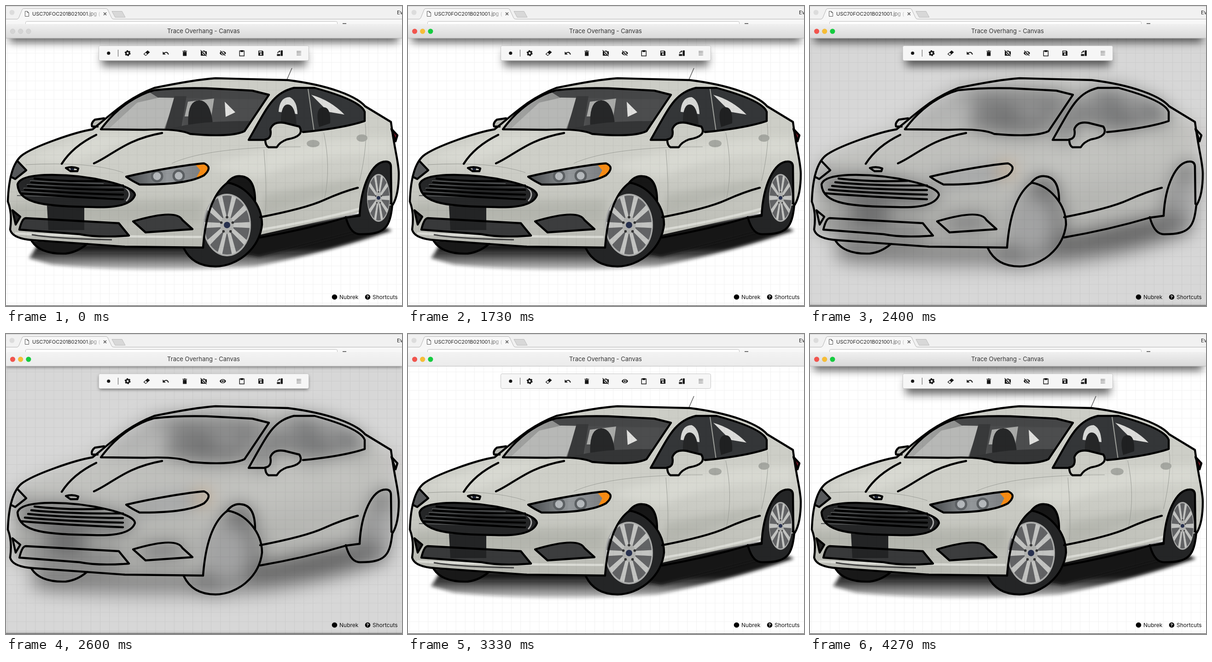
Recreate the animation shown at these times as an HTML page. Size 860x652 px, loop 4.34 s.

```html
<!DOCTYPE html>
<html lang="en">
<head>
<meta charset="utf-8">
<title>Canvas overlay</title>
<style>
html, body { margin: 0; width: 100%; height: 100%; overflow: hidden; background: #fff; }
svg { display: block; width: 860px; height: 652px; font-family: Inter, "Open Sans", sans-serif; }
.anim { animation: 4340ms step-end infinite; }
#photo { animation-name: photo; }
#frost { animation-name: frost; }
.deep { animation-name: deep; }
.mild { animation-name: mild; }
.slash { animation-name: slash; }
.lamps { animation-name: lamps; }
#speck { animation-name: speck; }
@keyframes photo { 0%, 76.65% { visibility: visible } 55.25% { visibility: hidden } }
@keyframes frost { 0%, 76.65% { visibility: hidden } 55.25% { visibility: visible } }
@keyframes deep { 0%, 78.3% { opacity: 1 } 56.85% { opacity: 0 } }
@keyframes mild { 0%, 62.85% { opacity: 0 } 56.85% { opacity: 1 } }
@keyframes slash { 0%, 78.3% { visibility: visible } 56.85% { visibility: hidden } }
@keyframes lamps { 0% { opacity: 0 } 27.6% { opacity: 1 } }
@keyframes speck { 0%, 27.6% { fill: #444 } 26% { fill: #d9453a } }
</style>
</head>
<body>
<svg viewBox="0 0 860 652">
  <defs>
    <linearGradient id="paint" x2="0" y2="1">
      <stop stop-color="#cccdc6"/><stop offset=".5" stop-color="#cecfc8"/><stop offset="1" stop-color="#b8b9b2"/>
    </linearGradient>
    <linearGradient id="glass">
      <stop stop-color="#a9aaa8"/><stop offset=".35" stop-color="#8c8d8c"/><stop offset=".5" stop-color="#4c4d4e"/>
    </linearGradient>
    <linearGradient id="lens">
      <stop stop-color="#45484a"/><stop offset=".5" stop-color="#93979a"/><stop offset="1" stop-color="#777a7d"/>
    </linearGradient>
    <linearGradient id="ground" x2="0" y2="1">
      <stop offset=".6" stop-color="#141414"/><stop offset="1" stop-color="#141414" stop-opacity=".25"/>
    </linearGradient>
    <linearGradient id="bar" x2="0" y2="1"><stop stop-color="#f3f3f3"/><stop offset="1" stop-color="#ebebeb"/></linearGradient>
    <linearGradient id="barDeep" x2="0" y2="1"><stop stop-color="#f0f0f0"/><stop offset="1" stop-color="#d9d9d9"/></linearGradient>
    <linearGradient id="fade"><stop offset=".78" stop-color="#222"/><stop offset="1" stop-color="#222" stop-opacity=".2"/></linearGradient>
    <pattern id="grid" x="3" y="82" width="20.1" height="20.1" patternUnits="userSpaceOnUse">
      <path d="M0 .5H20.1M.5 0V20.1" stroke="#000" stroke-opacity=".05"/>
    </pattern>
    <filter id="soft3" x="-10%" y="-50%" width="120%" height="200%"><feGaussianBlur stdDeviation="3.5"/></filter>
    <filter id="soft9" x="-20%" y="-99%" width="140%" height="300%"><feGaussianBlur stdDeviation="9"/></filter>
    <filter id="frosted" filterUnits="userSpaceOnUse" x="-60" y="0" width="980" height="720"
      color-interpolation-filters="sRGB"><feGaussianBlur stdDeviation="19"/></filter>
    <clipPath id="page"><rect y="70" width="860" height="582"/></clipPath>
    <clipPath id="inHull"><use href="#hull"/></clipPath>
    <clipPath id="inShield"><use href="#shield"/></clipPath>
    <clipPath id="inSide"><use href="#side"/></clipPath>
    <clipPath id="inLamp"><use href="#lamp"/></clipPath>
  </defs>

  <rect width="860" height="652" fill="#fff"/>
  <g clip-path="url(#page)">
    <g id="photo" class="anim"><g id="car">
      <path d="M50 548L70 518L400 512L760 455L838 488Q700 535 540 566Q300 582 100 562Z" fill="url(#ground)" filter="url(#soft3)"/>
      <path d="M425 522L760 455L780 485L550 545Z" fill="#181818" filter="url(#soft3)"/>
      <use href="#farTyre" fill="#181818"/>
      <use href="#hull" fill="url(#paint)"/>
      <g clip-path="url(#inHull)">
        <g filter="url(#soft9)" opacity=".5">
          <path d="M35 330L180 280L330 274L130 345ZM440 350Q600 285 840 285V325Q650 320 550 375Z" fill="#e2e3dc"/>
          <path d="M560 410L770 375L765 395L556 459ZM10 430L430 420L425 470L10 465Z" fill="#a6a8a0"/>
        </g>
        <path d="M20 494Q110 500 425 502M555 486Q680 465 770 440" stroke="#dadbd5" stroke-width="5" fill="none"/>
        <path d="M56 497Q110 506 230 508" stroke="#444" stroke-width="3" fill="none"/>
      </g>
      <g fill="none" stroke="#9c9e98">
        <path d="M43 345Q180 337 255 362M360 342Q440 306 640 306"/>
        <path d="M560 312Q567 390 563 455M690 275Q706 350 692 418M780 255Q786 300 768 380"/>
        <path d="M610 160L621 135" stroke="#666" stroke-width="1.6"/>
      </g>
      <g fill="#a5a7a1"><ellipse cx="667" cy="299" rx="14" ry="8"/><ellipse cx="773" cy="287" rx="12" ry="8"/></g>

      <use href="#shield" fill="url(#glass)"/>
      <g clip-path="url(#inShield)">
        <path d="M222 268L285 210L372 190L343 268Z" fill="#b7b8b6"/>
        <path d="M300 180H575L560 203L330 199Z" fill="#454647"/>
        <path d="M366 196H392L380 270H345Z" fill="#38393a"/>
        <path d="M395 208L452 201L446 240H388Z" fill="#a9aaa8"/>
        <path d="M396 265Q392 206 419 205T450 265Z" fill="#262728"/>
        <path d="M475 208L498 231L477 241Z" fill="#e0e0de"/>
        <path d="M345 272Q390 250 530 250V290Z" fill="#343536"/>
      </g>
      <use href="#side" fill="#343638"/>
      <g clip-path="url(#inSide)">
        <path d="M592 230Q594 198 616 198Q632 205 633 235Z" fill="#d6d7d5"/>
        <path d="M597 256Q596 214 612 214T631 257Z" fill="#252627"/>
        <path d="M663 193Q705 205 735 236L700 230Z" fill="#dcdcda"/>
        <path d="M680 263Q670 222 688 220T704 255Z" fill="#1f2021"/>
        <path d="M656 180L669 272" stroke="#a0a29d" stroke-width="2"/>
      </g>
      <use href="#mirror" fill="#cbccc5"/><use href="#cap" fill="#b9bab4"/>

      <use href="#lamp" fill="url(#lens)"/>
      <g clip-path="url(#inLamp)">
        <path d="M409 342H450L432 370L414 372L422 357Z" fill="#f78b13"/>
        <g fill="#b4b8bb" stroke="#5c6063" stroke-width="5"><circle cx="328" cy="370" r="11"/><circle cx="375" cy="369" r="11"/></g>
      </g>
      <use href="#farLamp" fill="#57595b"/><use href="#tail" fill="#7a1626"/>
      <use href="#grille" fill="#252627"/><use href="#intake" fill="#38393a"/>
      <use href="#fog" fill="#3c3d3e"/><use href="#farFog" fill="#222"/>
      <path d="M253 391Q278 405 261 424" stroke="#aaa" stroke-width="3" fill="none"/>
      <path d="M89 434L170 438V487H92Z" fill="#232425"/>
      <circle cx="144" cy="354" r="4" fill="#1b2235"/>
      <g id="bars" stroke="#555758" stroke-width="2" fill="none"></g>
      <use href="#arch" fill="#161616"/><use href="#tyre" fill="#242526"/>
      <use href="#rearArch" fill="#242526"/><use href="#rearTyre" fill="#242526"/>
      <g id="wheels"></g>
    </g></g>

    <g id="frost" class="anim">
      <g filter="url(#frosted)"><rect x="-80" width="1020" height="740" fill="#fff"/><use href="#car"/></g>
      <rect width="860" height="652" fill="#b2b2b2" fill-opacity=".52"/>
      <path d="M0 649H860" stroke="#888"/>
    </g>
    <rect y="70" width="860" height="582" fill="url(#grid)"/>

    <!-- hand-drawn outline, also used as fills above -->
    <g fill="none" stroke="#000" stroke-width="4.4" stroke-linecap="round" stroke-linejoin="round">
      <path id="hull" d="M428 525L258 523L60 509Q14 506 9 486Q14 450 4 425C5 395 10 345 34 325C60 305 150 274 188 268C235 230 265 200 322 178Q410 160 455 157L612 161C700 172 760 195 780 218L836 252C845 320 853 340 853 365Q853 410 840 432"/>
      <path id="cap" d="M199 262H187Q184 254 193 247L213 244"/>
      <path id="shield" d="M206 268C245 215 290 192 322 183Q390 176 460 180L535 184L571 193L518 272Q490 286 400 278Q375 266 300 269Z"/>
      <path d="M121 343Q145 305 196 280M191 342C230 325 260 290 339 276"/>
      <path id="side" d="M563 291H527C570 215 580 190 625 178H670Q770 205 779 230V250Q730 266 645 274"/>
      <path id="mirror" d="M563 290Q578 288 574 268Q580 250 605 254L637 262Q650 283 610 290Q594 296 588 307H570Q563 303 563 290"/>
      <path id="tail" d="M837 267L850 281L846 294Z"/>
      <path id="rearArch" d="M768 456C771 390 795 338 825 338Q836 338 836 350L837 430"/>
      <path id="rearTyre" d="M738 459Q748 497 770 496C825 496 834 480 839 432"/>
      <path d="M768 456L738 460"/>
      <path d="M552 459Q650 440 690 422T764 395M552 503Q650 486 738 460"/>
      <path id="arch" d="M479 386Q492 368 510 370Q541 372 541 424"/>
      <path id="tyre" d="M428 525C432 470 445 410 481 384C520 390 556 430 556 475C550 530 500 566 455 566Q405 566 386 526"/>
      <path id="lamp" d="M261 371C320 357 400 344 430 342Q450 350 430 368C390 390 310 388 290 388Q270 378 261 371"/>
      <path id="farLamp" d="M25 337L44 357L20 376L10 371"/>
      <path id="badge" d="M130 352Q144 348 157 353L155 359H140Z"/>
      <path id="grille" d="M25 388Q30 367 100 367C180 367 280 390 280 411Q270 440 190 437C90 435 28 432 25 388"/>
      <path id="intake" d="M29 486Q35 461 43 461L245 472L267 499Q200 504 160 496Z"/>
      <path id="fog" d="M276 468Q370 440 383 465L405 485L303 492Z"/>
      <path id="farFog" d="M14 444L31 458L21 475Z"/>
      <path id="farTyre" d="M56 511Q75 540 130 538Q155 535 176 517"/>
      <g id="slats"></g>
    </g>
    <g class="anim deep" filter="url(#soft9)">
      <rect x="8" y="45" width="844" height="34" opacity=".62"/>
      <rect x="208" y="98" width="444" height="33" opacity=".58"/>
    </g>
    <g class="anim mild" filter="url(#soft3)">
      <rect y="52" width="860" height="20" opacity=".5"/>
      <rect x="203" y="91" width="453" height="29" opacity=".6"/>
    </g>
    <path d="M0 651.5H860" stroke="#222"/>
  </g>

  <!-- browser strip -->
  <rect width="860" height="42" fill="#f1f1f1"/>
  <path d="M0 .5H860" stroke="#c9c9c9"/>
  <g fill="#dcdcdc"><circle cx="13" cy="14" r="5.5"/><circle cx="-5" cy="14" r="5.5"/></g>
  <path d="M-2 28.5H24Q27 28 28 25L35 8Q36 5.5 39 5.5H217Q220 5.5 221 8L229 25Q230 28.5 234 28.5H862V44H-2Z" fill="#f7f7f7" stroke="#b4b4b4"/>
  <path d="M230 11.5H252L259 24.5H237Z" fill="#d8d8d8" stroke="#bbb" stroke-linejoin="round"/>
  <path d="M41.5 11.5H46.5L49.5 14.5V22.5H41.5ZM46.5 11.5V14.5H49.5" fill="#fff" stroke="#555"/>
  <text x="57" y="21" font-size="11" fill="url(#fade)">USC70FOC201B021001.jpg (</text>
  <path d="M212 14L218 20M218 14L212 20" stroke="#555" stroke-width="1.5"/>
  <text x="849" y="18" font-size="11" fill="#222">Ev</text>
  <rect x="42.5" y="33.5" width="677" height="14" rx="3" fill="#fff" stroke="#bdbdbd"/>
  <rect id="speck" class="anim" x="731" y="37.5" width="8" height="2"/>

  <!-- window title -->
  <path id="head" d="M0 70V44Q0 39 5 39H855Q860 39 860 44V70Z" fill="url(#bar)"/>
  <path class="anim deep" d="M0 70V44Q0 39 5 39H855Q860 39 860 44V70Z" fill="url(#barDeep)"/>
  <path d="M0 70H860" stroke="#b9b9b9"/>
  <g id="idle"></g>
  <g id="live" class="anim lamps"></g>
  <text x="429" y="59" font-size="13" text-anchor="middle" fill="#333">Trace Overhang - Canvas</text>

  <!-- toolbar: icons are centred on 0,0 and spaced by script -->
  <rect x="201.5" y="86.5" width="456" height="32" rx="3" fill="#f6f6f6" stroke="#c6c6c6"/>
  <path d="M243.5 95V110" stroke="#555"/>
  <g id="icons" fill="#161616">
    <g><circle r="3.6"/></g>
    <g fill="none" stroke="#161616">
      <circle r="3.7" stroke-width="3"/><circle r="5.5" stroke-width="2" stroke-dasharray="2.88"/>
    </g>
    <g><path d="M-7 2L2 -6L7 -2L-2 6Z"/><path d="M-5 2L-2 -1L1 2L-2 4.500Z" fill="#f6f6f6"/></g>
    <g><path d="M-4 0Q3 -5 6 3" fill="none" stroke="#161616" stroke-width="1.9"/><path d="M-6.5 -3.500V3H0Z"/></g>
    <g><path d="M-4 -3H4V6H-4ZM-5 -5H-2L-1 -6H1L2 -5H5V-3.700H-5Z"/></g>
    <g>
      <path d="M-6.5 -4H-3L-2 -5.500H2L3 -4H6.500V5.500H-6.500Z"/><circle r="2.7" stroke="#f6f6f6" stroke-width="1.4"/>
      <path d="M-6 -7L7 6" stroke="#f6f6f6" stroke-width="1.5"/><path d="M-7 -6.500L6 6.500" stroke="#161616" stroke-width="1.4"/>
    </g>
    <g>
      <path d="M-7 0C-4 -6 4 -6 7 0C4 6 -4 6 -7 0Z"/><circle r="2.6" stroke="#f6f6f6" stroke-width="1.4"/>
      <g class="anim slash"><path d="M-4.500 -6L7 5.500" stroke="#f6f6f6" stroke-width="1.5"/><path d="M-5.500 -5.500L5.500 5.500" stroke="#161616" stroke-width="1.4"/></g>
    </g>
    <g><path d="M-5 -5H5V6H-5Z" fill="none" stroke="#161616" stroke-width="1.4"/><path d="M-3 -6.500H3V-2.500H-3Z"/></g>
    <g><path d="M-5.500 -5.500H3.500L5.500 -3.500V5.500H-5.500Z"/><path d="M-4 -4H2V-1.500H-4Z" fill="#f6f6f6"/><circle cy="2" r="1.9" fill="#f6f6f6"/></g>
    <g><path d="M1.500 -6H6V6H1.500ZM-6.500 2H.5V6H-6.500ZM-2 -6.500L1 -3.700L-2 -1Z"/><path d="M-5 .5Q-4.500 -3.500 -1 -3.700" fill="none" stroke="#161616" stroke-width="1.5"/></g>
    <g><path d="M-4.500 -4H4.500M-4.500 -1.200H4.500M-4.500 1.600H4.500M-4.500 4.400H4.500" stroke="#333" stroke-width="1.4" stroke-dasharray="1.4"/></g>
  </g>

  <!-- footer -->
  <circle cx="713.5" cy="632.5" r="5.8"/><circle cx="785.5" cy="632.5" r="5.8"/>
  <text x="785.5" y="636" font-size="9.5" font-weight="700" text-anchor="middle" fill="#fff">?</text>
  <g font-size="12" fill="#111"><text x="724" y="637">Nubrek</text><text x="796" y="637">Shortcuts</text></g>
</svg>
<script>
const $ = id => document.getElementById(id);

function add(parent, tag, attrs) {
  const el = document.createElementNS("http://www.w3.org/2000/svg", tag);
  for (const k in attrs) el.setAttribute(k, attrs[k]);
  parent.append(el);
}

[...$("icons").children].forEach((icon, i) => icon.setAttribute("transform", `translate(${222.8 + 41.35 * i} 102.5)`));

["#f2544d", "#f7bd35", "#14cc3f"].forEach((fill, i) => {
  const spot = { cx: 14.5 + 17.2 * i, cy: 55 };
  add($("idle"), "circle", { ...spot, r: 5.2, fill: "#d4d4d4", stroke: "#c3c3c3", "stroke-width": .6 });
  add($("live"), "circle", { ...spot, r: 5.5, fill });
});

for (let i = 0; i < 5; i++) {
  const left = 62 - 7 * Math.min(i, 4), right = 212 + 42 * Math.min(i, 1), y = 375 + 8 * i;
  add($("slats"), "path", { d: `M${left} ${y}Q130 ${y + 8} ${right} ${y + 5 + 2 * i}` });
  add($("bars"), "path", { d: `M${left - 10} ${y + 5}L${right} ${y + 11}` });
}

// Ten-spoke rim, flattened by perspective
function wheel(cx, cy, rx, ry, hub) {
  const rim = $("wheels");
  const oval = (k, fill) => add(rim, "ellipse", { cx, cy, rx: rx * k, ry: ry * k, fill });
  const at = (turn, k) => `${cx + Math.cos(turn) * rx * k} ${cy + Math.sin(turn) * ry * k}`;
  oval(1, "#a9aaa9");
  oval(.94, "#626365");
  for (let i = 0; i < 10; i++) {
    const t = i * Math.PI / 5;
    add(rim, "path", { d: `M${at(t - .3, .22)}L${at(t - .1, .96)}L${at(t + .1, .96)}L${at(t + .3, .22)}Z`, fill: "#c2c3c1" });
  }
  oval(.28, "#b0b1af");
  for (let i = 0; i < 5; i++) {
    const [x, y] = at((i - 1.25) * Math.PI * .4, .25).split(" ");
    add(rim, "circle", { cx: x, cy: y, r: hub * .4, fill: "#333" });
  }
  add(rim, "circle", { cx, cy, r: hub, fill: "#27304e" });
}
wheel(480, 476, 52, 68, 7);
wheel(809, 417, 25, 52, 4);
</script>
</body>
</html>
```
